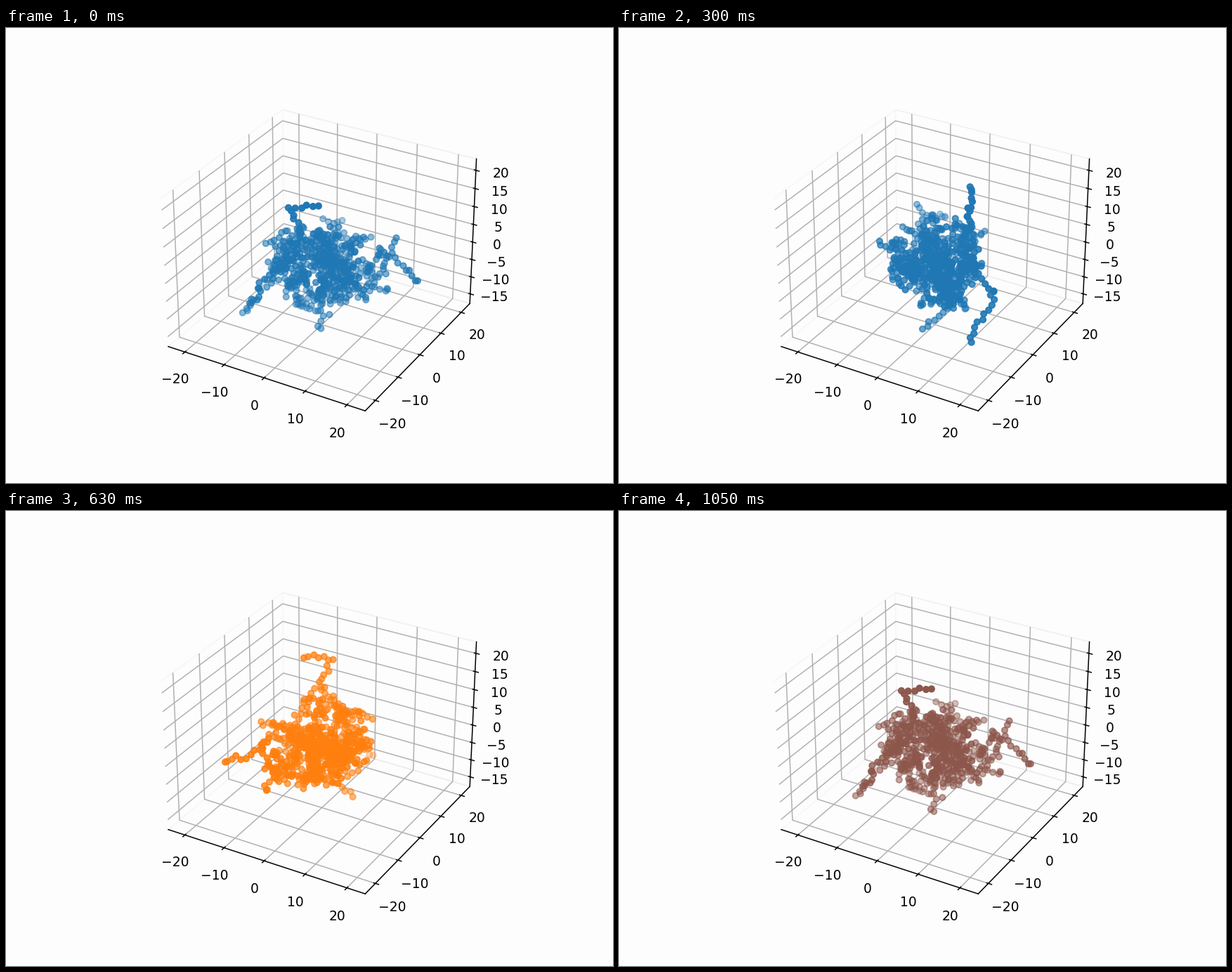
Write a matplotlib script that moves like this. It is 864x648 px and loops after 1.08 s.

```python
import numpy as np
import matplotlib.pyplot as plt
from matplotlib.animation import FuncAnimation

FRAMES, INTERVAL = 36, 30
STEP, COUNT = 1.4, 600
BODY = np.array([14, 11.5, 11.5])  # half-axes of the dense middle

# Outermost branch tips: (right, back, up) as seen by the camera
TIPS = [
    (-4.7, -6.5, 13.5), (-7, -5.5, 18.5), (-0.7, -7.5, 20.2),
    (20.4, -7, -0.5), (16, 0.4, 6.6), (14.3, -0.5, -7.3),
    (-17.2, -4, -11.6), (-5.5, 4, -14.7), (-0.2, -7, -14),
    (-13.5, -9.7, -0.8), (7, -12.9, 2.6), (4.5, 11.2, 4.7),
]


def spin(points, degrees):
    """Turn points about the vertical axis."""
    t = np.radians(degrees)
    c, s = np.cos(t), np.sin(t)
    return points @ np.array([[c, s, 0], [-s, c, 0], [0, 0, 1]])


def grow_cluster():
    """Grow a branching tree of touching particles from the origin."""
    rng = np.random.default_rng(7)
    nodes = [np.zeros(3)]

    def unit(v):
        return v / np.linalg.norm(v)

    def nearest(goal):
        gaps = np.linalg.norm(np.array(nodes) - goal, axis=1)
        k = gaps.argmin()
        return nodes[k], gaps[k]

    def advance(p, goal):
        return p + STEP * unit(unit(goal - p) + rng.normal(0, 0.35, 3))

    for tip in sorted(np.array(TIPS), key=np.linalg.norm):
        p, gap = nearest(tip)
        while gap > STEP:
            p = advance(p, tip)
            nodes.append(p)
            gap = np.linalg.norm(tip - p)
        nodes.append(tip)

    while len(nodes) < COUNT:
        goal = BODY * unit(rng.normal(size=3)) * rng.random() ** 0.42
        p, gap = nearest(goal)
        if gap > 0.6:
            nodes.append(advance(p, goal))
    return spin(np.array(nodes), 30)


cluster = grow_cluster()

fig = plt.figure(figsize=(6.4, 4.8), dpi=135, facecolor="#fdfdfd")
ax = fig.add_subplot(projection="3d", facecolor="#fdfdfd")
ax.set_xlim(-24.3, 24.3)
ax.set_ylim(-24.37, 24.37)
ax.set_zlim(-17.85, 23.12)
ax.set_xticks(range(-20, 21, 10))
ax.set_yticks(range(-20, 21, 10))
ax.set_zticks(range(-15, 21, 5))
for axis in (ax.xaxis, ax.yaxis, ax.zaxis):
    axis.pane.fill = False

dots = []


def draw(i):
    while dots:
        dots.pop().remove()
    x, y, z = spin(cluster, 360 * i / (FRAMES - 1)).T
    dots.append(ax.scatter(x, y, z, s=20, color=f"C{i % 10}"))
    return dots


anim = FuncAnimation(fig, draw, frames=FRAMES, interval=INTERVAL,
                     repeat=True, repeat_delay=0)
plt.show()
```
